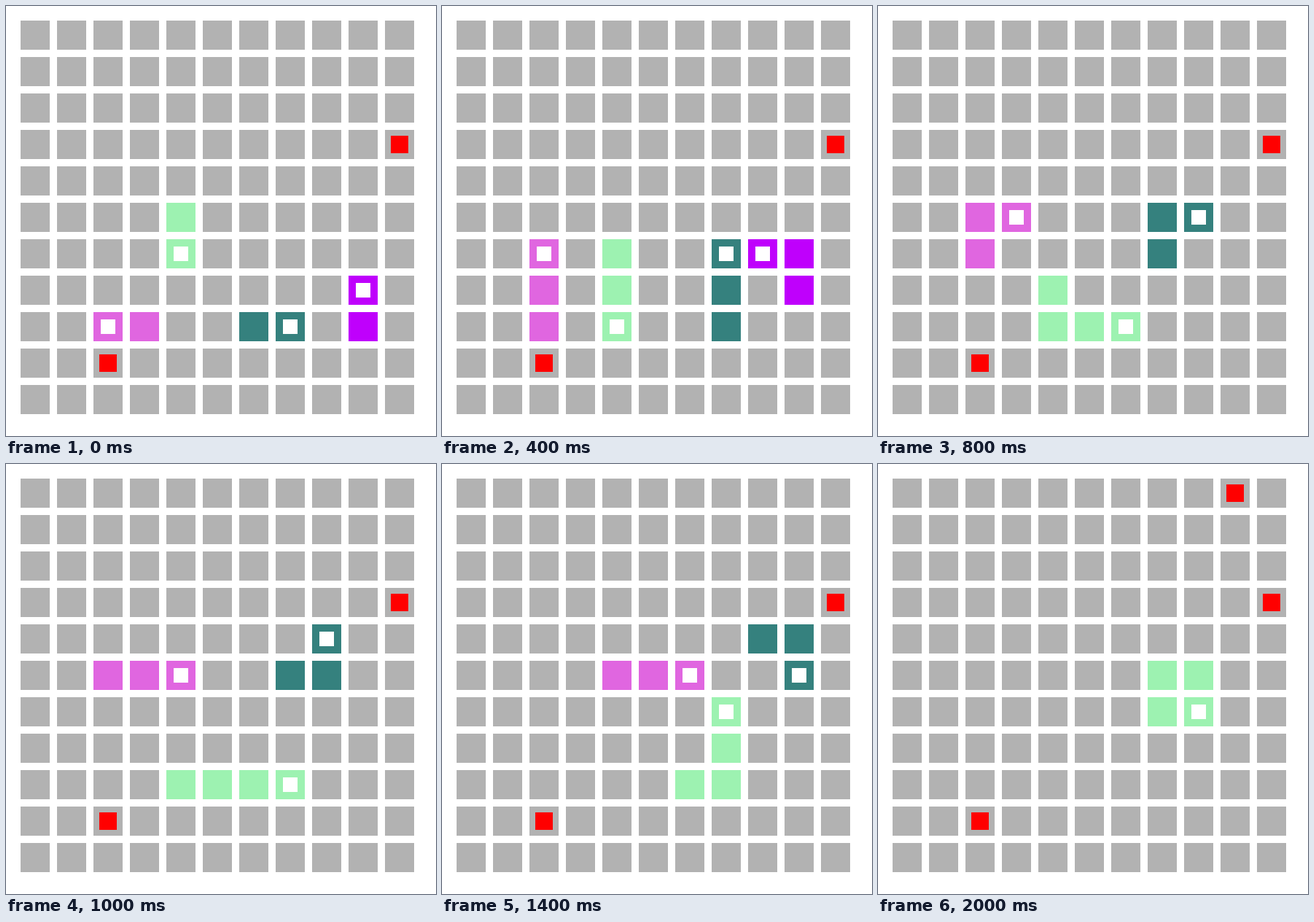
An HTML page that plays this animation: 590x590 px, repeating every 2.2 s.

```html
<!DOCTYPE html>
<html lang="en">
<head>
<meta charset="utf-8">
<title>Snakes on a grid</title>
<style>
  html, body { margin: 0; width: 100%; height: 100%; overflow: hidden; background: #fff; }
  svg { display: block; width: 590px; height: 590px; }
</style>
</head>
<body>
<svg viewBox="0 0 590 590" shape-rendering="crispEdges">
  <g id="board"></g>
  <g id="pieces"></g>
</svg>
<script>
const SIZE = 11, STEP = 200, STEPS = 11;
const DIRS = { U: [0, -1], D: [0, 1], L: [-1, 0], R: [1, 0] };

// Each snake starts at its tail; the first move leads to its first head cell.
const snakes = [
  { color: '#e066e0', start: [3, 8], moves: 'LUUURRRR', end: 8 },
  { color: '#9df2b1', start: [4, 5], moves: 'DDDRRRUUURD', end: STEPS, grows: 3 },
  { color: '#35817e', start: [6, 8], moves: 'RUUURURDDL', end: 10 },
  { color: '#bf00fc', start: [9, 8], moves: 'UUL', end: 3 }
];

const foods = [
  { cell: [10, 3], from: 0, to: STEPS },
  { cell: [2, 9], from: 0, to: STEPS },
  { cell: [4, 8], from: 1, to: 2 },
  { cell: [9, 0], from: 9, to: STEPS }
];

for (const s of snakes) {
  s.path = [s.start];
  for (const m of s.moves) {
    const [x, y] = s.path[s.path.length - 1];
    s.path.push([x + DIRS[m][0], y + DIRS[m][1]]);
  }
}

function square([col, row], size, color) {
  const inset = (40 - size) / 2;
  return `<rect x="${20 + 50 * col + inset}" y="${20 + 50 * row + inset}" width="${size}" height="${size}" fill="${color}"/>`;
}

function drawSnake(s, step) {
  const length = step >= s.grows ? 4 : 3;
  const body = s.path.slice(Math.max(0, step + 2 - length), step + 2);
  return body.map(c => square(c, 40, s.color)).join('') +
    square(body[body.length - 1], 20, '#fff');
}

function draw(step) {
  const food = foods.filter(f => step >= f.from && step < f.to)
    .map(f => square(f.cell, 24, '#f00'));
  const alive = snakes.filter(s => step < s.end).map(s => drawSnake(s, step));
  pieces.innerHTML = food.concat(alive).join('');
}

const board = document.getElementById('board');
const pieces = document.getElementById('pieces');
board.innerHTML = Array.from({ length: SIZE * SIZE },
  (_, i) => square([i % SIZE, Math.floor(i / SIZE)], 40, '#b2b2b2')).join('');

let shown = 0;
draw(0);
const begin = performance.now();

function tick() {
  const step = Math.floor((performance.now() - begin) / STEP) % STEPS;
  if (step !== shown) draw(shown = step);
  requestAnimationFrame(tick);
}
requestAnimationFrame(tick);
</script>
</body>
</html>
```
